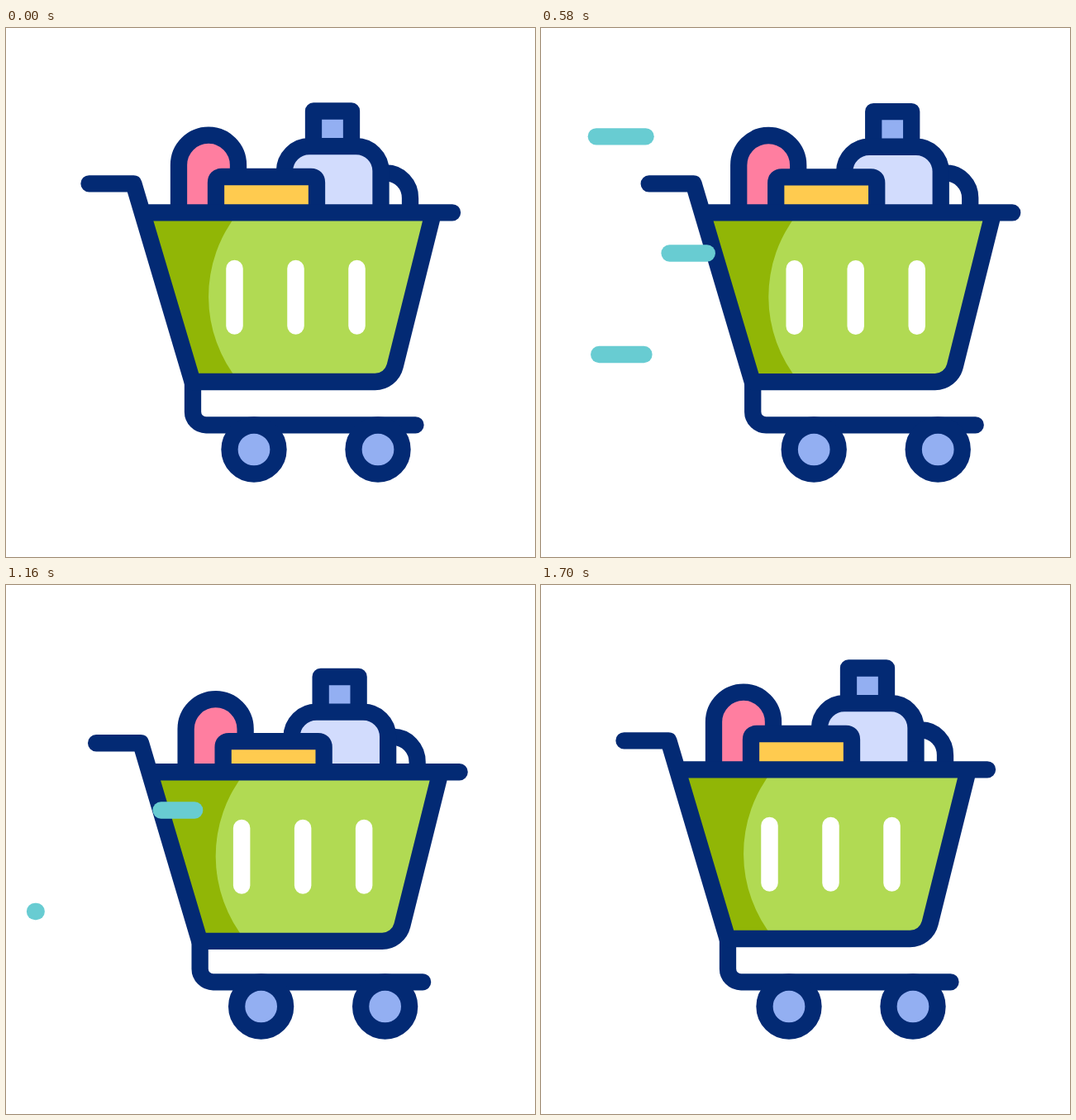
An HTML page that plays this animation: 640 px wide and 640 px high, repeating every 2000 ms.

```html
<!DOCTYPE html>
<html lang="en">
<head>
<meta charset="utf-8">
<title>Shopping cart</title>
<style>
  html, body { margin: 0; width: 100%; height: 100%; overflow: hidden; background: #fff; }
  svg { display: block; width: 100vw; height: 100vh; }
  .ink { stroke: #032a74; stroke-width: 20.3; stroke-linecap: round; stroke-linejoin: round; }
  .dash { stroke: #68ccd2; stroke-width: 20.3; stroke-linecap: round; }
</style>
</head>
<body>
<svg viewBox="0 0 640 640">
  <g id="cart" fill="none">
    <g class="ink">
      <path d="M226 428V464A16 16 0 0 0 242 480.3H495.5"/>
      <circle cx="300" cy="510" r="29.5" fill="#93aff2"/>
      <circle cx="450" cy="510" r="29.5" fill="#93aff2"/>
      <path id="grip" d="M448 175.5H460A29 30 0 0 1 489 206V236"/>
      <g id="bottle">
        <path d="M372 143V100.5H418V143" fill="#93aff2"/>
        <path d="M337 236V173A30 30 0 0 1 367 143.2H423.5A30 30 0 0 1 453.5 173V236" fill="#d2dcfd"/>
      </g>
      <path id="loaf" d="M209 236V165.7A36 36 0 0 1 281 165.7V236" fill="#ff7ea0"/>
      <path id="box" d="M254 236V187Q254 180 261 180H369Q376 180 376 187V236" fill="#ffcb4f"/>
    </g>
    <g id="basket">
      <path d="M165 223.3H517L470.7 409A25 25 0 0 1 446.5 428H225.6Z" fill="#91b606"/>
      <path d="M281 223.3A162 162 0 0 0 282 428H446.5A25 25 0 0 0 470.7 409L517 223.3Z" fill="#b1da53"/>
      <path d="M276.5 291V360.5M350.5 291V360.5M424.5 291V360.5" stroke="#fff" stroke-width="20.5" stroke-linecap="round"/>
      <path class="ink" d="M100.5 188.3H154.4L225.6 428H446.5A25 25 0 0 0 470.7 409L517 223.3M165 223.3H540"/>
    </g>
  </g>
  <g id="dashes"></g>
</svg>
<script>
const LOOP = 2000, START = 200, BEAT = 360, END = START + 4 * BEAT;
const $ = id => document.getElementById(id);
const ease = u => { u = Math.min(1, Math.max(0, u)); return u * u * (3 - 2 * u); };
const mix = (a, b, k) => a + (b - a) * k;

// [time, horizontal offset]
const sway = [[200, 0], [560, 30.7], [920, -17.8], [1280, 17.7], [1700, 0]];

// drop in px, and the share of a beat at which it is deepest
const bounce = {
  basket: [4, 0.5],
  bottle: [14.3, 0.5],
  box: [12.5, 0.5],
  loaf: [9.8, 0.57],
  grip: [8.5, 0.66]
};

const dashes = [
  { y: 477, from: 236, to: 151, at: 200, span: 240, lag: 76 },
  { y: 131.3, from: 187, to: 49, at: 395, span: 240, lag: 76 },
  { y: 395, from: 170, to: 49, at: 405, span: 240, lag: 76 },
  { y: 272.5, from: 236, to: 136, at: 409, span: 240, lag: 76 },
  { y: 452.5, from: 236, to: 146, at: 604, span: 180, lag: 57 },
  { y: 395, from: 240, to: 35, at: 846, span: 240, lag: 88 },
  { y: 272.5, from: 236, to: 135.3, at: 1044, span: 240, lag: 76 }
];
for (const d of dashes) {
  d.el = document.createElementNS("http://www.w3.org/2000/svg", "path");
  d.el.setAttribute("class", "dash");
  $("dashes").append(d.el);
}

function offset(t) {
  let x = 0;
  for (let i = 1; i < sway.length; i++) {
    const [t0, a] = sway[i - 1], [t1, b] = sway[i];
    if (t >= t0 && t < t1) x = mix(a, b, ease((t - t0) / (t1 - t0)));
  }
  return x;
}

function drop(t, depth, peak) {
  if (t < START || t >= END) return 0;
  const p = (t - START) / BEAT % 1;
  return depth * ease(p < peak ? p / peak : (1 - p) / (1 - peak));
}

const shift = (el, x, y) => el.setAttribute("transform", `translate(${x.toFixed(2)} ${y.toFixed(2)})`);

function draw(t) {
  shift($("cart"), offset(t), 0);
  for (const id in bounce) shift($(id), 0, drop(t, ...bounce[id]));
  for (const { y, from, to, at, span, lag, el } of dashes) {
    const on = t > at && t < at + span + lag;
    el.style.display = on ? "" : "none";
    if (!on) continue;
    const head = mix(from, to, ease((t - at) / span));
    const tail = mix(from, to, ease((t - at - lag) / span));
    el.setAttribute("d", `M${tail.toFixed(2)} ${y}H${head.toFixed(2)}`);
  }
}

const t0 = performance.now();
function tick() {
  draw((performance.now() - t0) % LOOP);
  requestAnimationFrame(tick);
}
tick();
</script>
</body>
</html>
```
